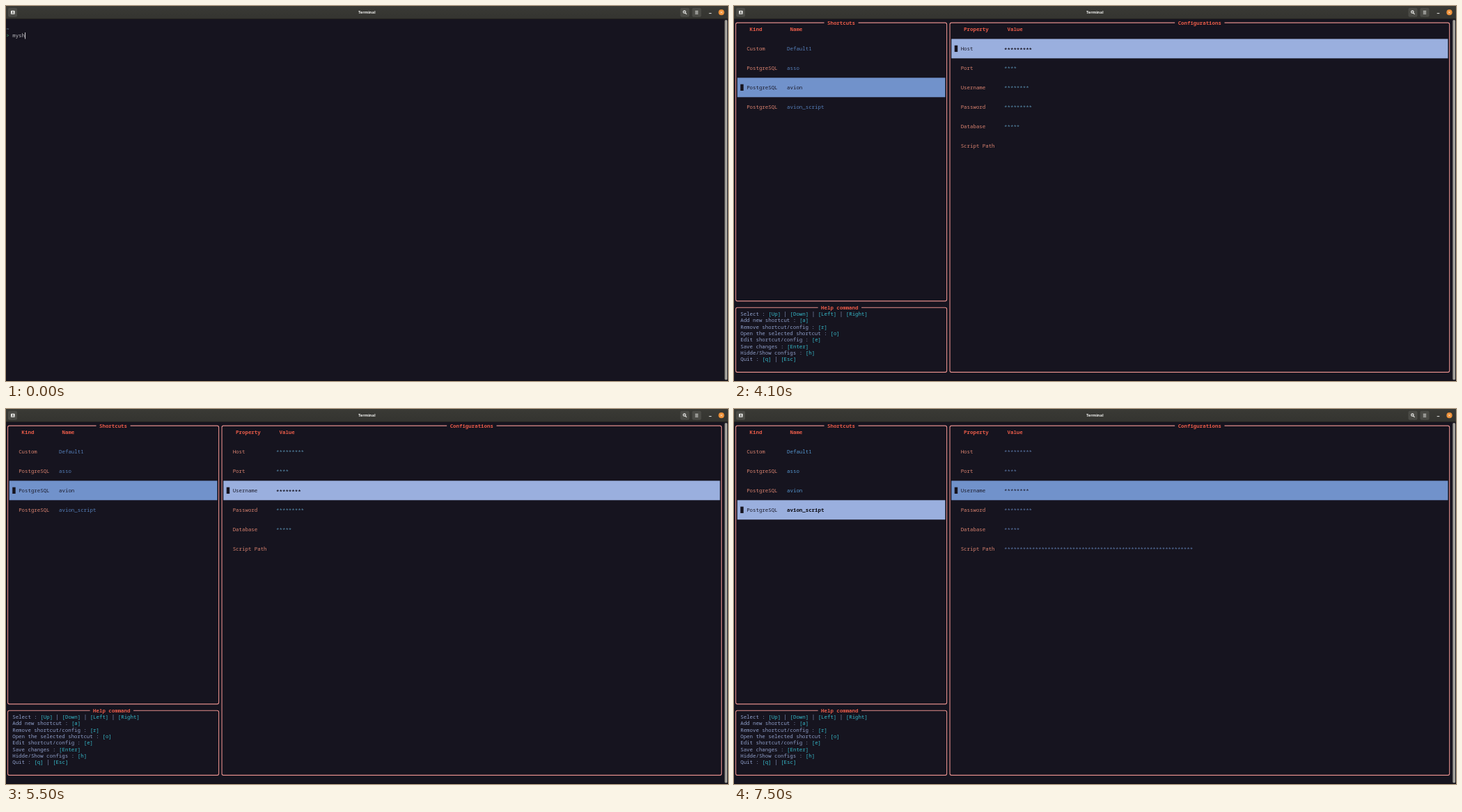
Recreate the animation shown at these times as an HTML page with a canvas. Size 1037x540 px, loop 8 s.

```html
<!DOCTYPE html>
<html lang="en">
<head>
<meta charset="utf-8">
<title>Terminal</title>
<style>
html, body { margin: 0; width: 100%; height: 100%; overflow: hidden; background: #16141f; }
canvas { display: block; }
</style>
</head>
<body>
<canvas id="stage" width="1037" height="540"></canvas>
<script>
const ctx = document.getElementById('stage').getContext('2d');
const LOOP = 8000;
const CELL_W = 4.457, ROW_H = 9.32, LEFT = 0.3, TOP = 19.45;
const MONO = '"Noto Sans Mono", "DejaVu Sans Mono", monospace';
const COLOR = {
  bg: '#16141f', ink: '#1b1a29', border: '#e28d8b', title: '#e75b49', label: '#d9826f',
  name: '#5495ce', dimName: '#557fb9', value: '#5689a8', dimValue: '#5a76a5',
  help: '#8f9fca', key: '#36b9c9', active: '#9aafde', passive: '#7192cb'
};
const SHORTCUTS = [['Custom', 'Default1'], ['PostgreSQL', 'asso'],
  ['PostgreSQL', 'avion'], ['PostgreSQL', 'avion_script']];
const PROPERTIES = ['Host', 'Port', 'Username', 'Password', 'Database', 'Script Path'];
const LENGTHS = [[27], [9, 4, 8, 9, 4, 0], [9, 4, 8, 9, 5, 0], [9, 4, 8, 9, 5, 61]];
const HELP = ['Select : [Up] | [Down] | [Left] | [Right]', 'Add new shortcut : [a]',
  'Remove shortcut/config : [r]', 'Open the selected shortcut : [o]',
  'Edit shortcut/config : [e]', 'Save changes : [Enter]',
  'Hidde/Show configs : [h]', 'Quit : [q] | [Esc]'];

// Each entry: start time, selected shortcut, selected property, focused panel
const STEPS = [
  [1000, 0, 0, 'left'], [3100, 1, 0, 'left'], [3600, 2, 0, 'left'],
  [4100, 2, 0, 'right'], [4400, 2, 1, 'right'], [4600, 2, 2, 'right'],
  [4800, 2, 3, 'right'], [5000, 2, 4, 'right'], [5300, 2, 3, 'right'],
  [5500, 2, 2, 'right'], [5900, 2, 2, 'left'], [6300, 3, 2, 'left'],
  [6700, 2, 2, 'left'], [7500, 3, 2, 'left']
];

const colX = col => LEFT + col * CELL_W;
const rowY = row => TOP + row * ROW_H;
const midY = row => rowY(row + 0.5);

function rect(x, y, w, h, color) {
  ctx.fillStyle = color;
  ctx.fillRect(x, y, w, h);
}

function roundRect(x, y, w, h, r, color) {
  ctx.fillStyle = color;
  ctx.beginPath();
  ctx.roundRect(x, y, w, h, r);
  ctx.fill();
}

function line(color, width, ...points) {
  ctx.strokeStyle = color;
  ctx.lineWidth = width;
  ctx.beginPath();
  points.forEach(([x, y]) => ctx.lineTo(x, y));
  ctx.stroke();
}

function write(text, col, row, color, bold = false, shift = 0) {
  ctx.font = `${bold ? 'bold ' : ''}${CELL_W / 0.6}px ${MONO}`;
  ctx.textAlign = 'left';
  ctx.fillStyle = color;
  ctx.fillText(text, colX(col), midY(row) + 2.6 + shift);
}

function titleBar() {
  const shade = ctx.createLinearGradient(0, 0, 0, 18);
  shade.addColorStop(0, '#3a3a35');
  shade.addColorStop(1, '#343430');
  rect(0, 0, 1037, 18.5, shade);
  rect(0, 18, 1037, 1, '#22211f');
  for (const x of [3, 968.5, 985.5]) roundRect(x, 2.7, 13, 13, 2, '#4b4b46');

  ctx.font = 'bold 5.6px "Open Sans", "Noto Sans", sans-serif';
  ctx.textAlign = 'center';
  ctx.fillStyle = '#f2f2f0';
  ctx.fillText('Terminal', 518.3, 11.2);

  roundRect(7, 6.8, 5.6, 5, 0.6, '#f0f0ee');
  rect(8.9, 7.8, 1.8, 1.8, '#4b4b46');
  rect(8, 10.4, 3.6, 0.6, '#4b4b46');

  ctx.strokeStyle = '#f0f0ee';
  ctx.lineWidth = 1.1;
  ctx.beginPath();
  ctx.arc(974.4, 8.6, 1.7, 0, Math.PI * 2);
  ctx.stroke();
  line('#f0f0ee', 1.2, [975.6, 9.8], [977.6, 11.8]);
  for (const y of [7.4, 9.3, 11.2]) line('#e6e6e3', 0.9, [989.8, y], [994.2, y]);
  line('#e6e6e3', 1, [1009.7, 10.6], [1013.3, 10.6]);

  ctx.fillStyle = '#ee9139';
  ctx.beginPath();
  ctx.arc(1027.5, 9.2, 4.1, 0, Math.PI * 2);
  ctx.fill();
  line('#fff0dc', 0.8, [1026.1, 7.8], [1028.9, 10.6]);
  line('#fff0dc', 0.8, [1028.9, 7.8], [1026.1, 10.6]);
}

function scrollBar() {
  rect(1031, 19, 6, 521, '#1f1d25');
  roundRect(1032.4, 20, 3.6, 518.5, 1.8, '#a5a39d');
  rect(0, 539, 1037, 1, '#100e17');
}

function panel(col0, row0, col1, row1, title, titleCol) {
  const x = colX(col0 + 0.5), y = midY(row0);
  ctx.strokeStyle = COLOR.border;
  ctx.lineWidth = 1.1;
  ctx.beginPath();
  ctx.roundRect(x, y, colX(col1 + 0.5) - x, midY(row1) - y, 2.3);
  ctx.stroke();
  rect(colX(titleCol - 1), y - 2, (title.length + 2) * CELL_W, 4, COLOR.bg);
  write(title, titleCol, row0, COLOR.title, true);
}

function highlight(col0, col1, row, focused) {
  const x = colX(col0), y = rowY(row - 1);
  rect(x, y, colX(col1) - x, ROW_H * 3, focused ? COLOR.active : COLOR.passive);
  rect(colX(col0 + 1), rowY(row), CELL_W, ROW_H, COLOR.bg);
}

function help() {
  panel(0, 44, 68, 54, 'Help command', 28);
  HELP.forEach((text, i) => {
    let col = 2;
    for (const part of text.split(/(\[\w+\])/)) {
      write(part, col, 45 + i, part.startsWith('[') ? COLOR.key : COLOR.help);
      col += part.length;
    }
  });
}

function shortcuts(selected, focused) {
  panel(0, 0, 68, 43, 'Shortcuts', 30);
  write('Kind', 5, 1, COLOR.title, true);
  write('Name', 18, 1, COLOR.title, true);
  SHORTCUTS.forEach(([kind, name], i) => {
    const row = 4 + i * 3, on = i === selected;
    if (on) highlight(1, 68, row, focused);
    write(kind, 4, row, on ? COLOR.ink : COLOR.label);
    write(name, 17, row, on ? (focused ? '#0c0c14' : COLOR.ink) : focused ? COLOR.name : COLOR.dimName, on && focused);
  });
}

function configurations(shortcut, selected, focused, warm) {
  const custom = shortcut === 0, valueCol = custom ? 89 : 87;
  panel(69, 0, 230, 54, 'Configurations', 143);
  write('Property', 74, 1, COLOR.title, true);
  write('Value', valueCol + 1, 1, COLOR.title, true);
  const idle = warm ? COLOR.label : focused ? COLOR.value : COLOR.dimValue;
  (custom ? ['Shell Command'] : PROPERTIES).forEach((label, i) => {
    const row = 4 + i * 3, on = i === selected;
    if (on) highlight(70, 230, row, focused);
    write(label, 73, row, on ? COLOR.ink : COLOR.label);
    write('*'.repeat(LENGTHS[shortcut][i]), valueCol, row, on ? COLOR.ink : idle, on && focused, 1.4);
  });
}

function prompt(time) {
  if (time >= 900) return;
  const command = time < 300 ? 'mysh' : 'myshortcuts ';
  const entered = time >= 800;
  write('~', 0, 1, '#7c9fb0');
  write('>', 0, 2, '#3d9f68');
  write(command, 2, 2, '#b9b8bd');
  rect(entered ? 1 : colX(2 + command.length), rowY(entered ? 3 : 2), 1, ROW_H, '#d0cfd2');
}

function draw(time) {
  rect(0, 0, 1037, 540, COLOR.bg);
  titleBar();
  scrollBar();
  const step = STEPS.findLast(([start]) => time >= start);
  if (!step) return prompt(time);
  const [, shortcut, property, focus] = step;
  shortcuts(shortcut, focus === 'left');
  configurations(shortcut, property, focus === 'right', time >= 3100 && time < 3200);
  help();
}

function tick() {
  draw(performance.now() % LOOP);
  requestAnimationFrame(tick);
}
tick();
</script>
</body>
</html>
```
